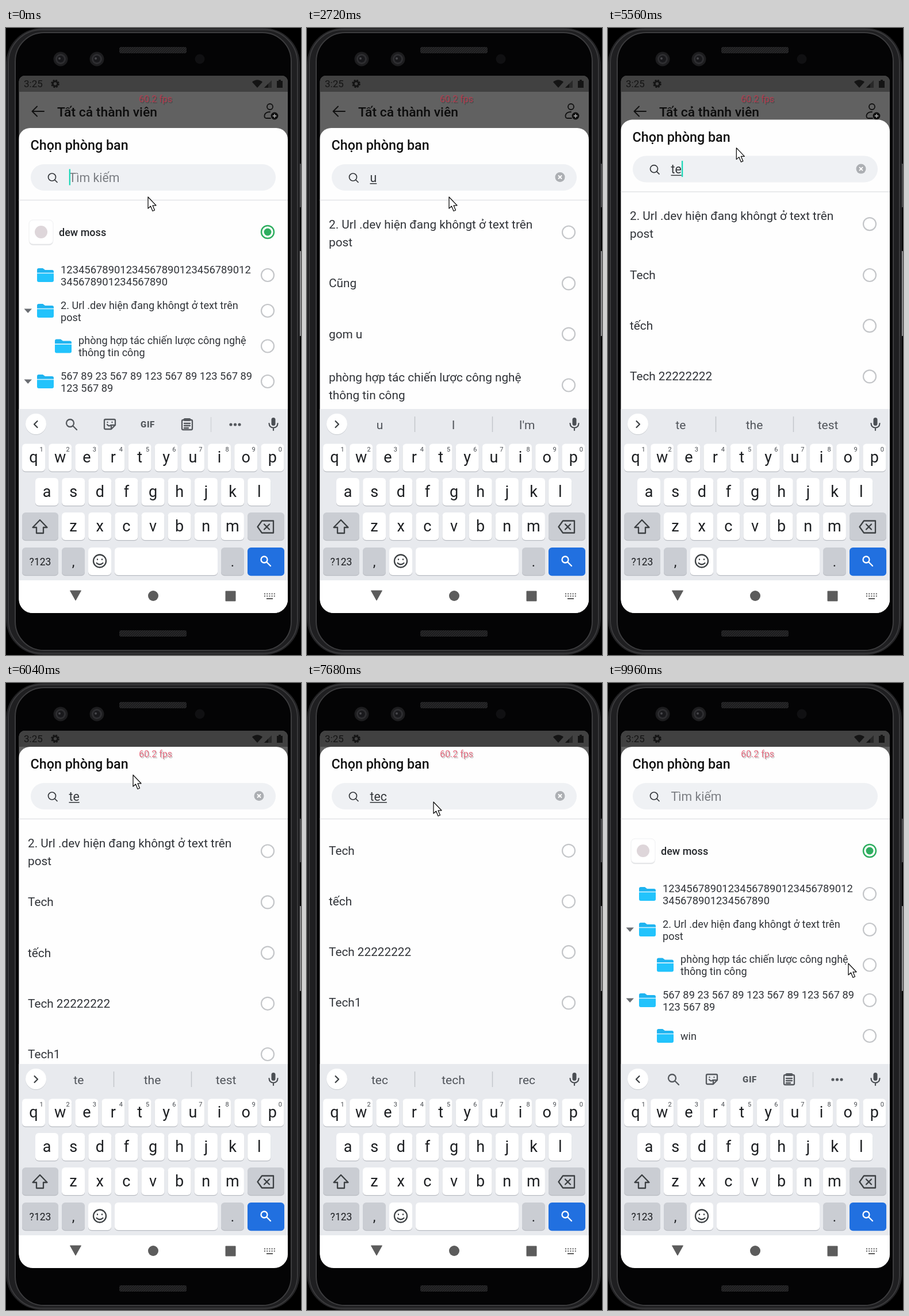
Recreate the animation shown at these times as an HTML page. Size 513x1091 px, loop 10 s.

```html
<!DOCTYPE html>
<html lang="vi">
<head>
<meta charset="utf-8">
<title>Chọn phòng ban</title>
<style>
html, body { margin: 0; width: 100%; height: 100%; overflow: hidden; background: #000; }
svg { display: block; width: 100vw; height: 100vh; font-family: Roboto, "Noto Sans", sans-serif; }
text { white-space: pre; }
.mid { text-anchor: middle; }
.med { font-weight: 500; }
.line { fill: none; stroke-linecap: round; stroke-linejoin: round; }
</style>
</head>
<body>
<svg id="stage" viewBox="0 0 513 1091" preserveAspectRatio="none">
  <defs>
    <clipPath id="screen"><path d="M22.500 93A10 10 0 0 1 32.500 83H480A10 10 0 0 1 490 93V994A24 24 0 0 1 466 1018H46.500A24 24 0 0 1 22.500 994Z"/></clipPath>
    <pattern id="mesh" width="4" height="4" patternUnits="userSpaceOnUse">
      <rect width="4" height="4" fill="#272729"/><path d="M0 4L4 0" stroke="#111"/>
    </pattern>
    <g id="lens"><circle r="12.5" fill="#1d1d1f"/><circle r="9" fill="#2e2e31"/><circle r="6" fill="#19191c"/><circle cx="-2" cy="-1" r="2" fill="#47474b"/></g>
    <g id="folder">
      <path d="M0-9Q0-12 3-12H10L14-9H26Q29-9 29-6V-4H0Z" fill="#1fb4f0"/>
      <path d="M0-3H29V9Q29 12 26 12H3Q0 12 0 9Z" fill="#22c3fc"/>
      <path d="M0-3.5H29" stroke="#d9f4ff" stroke-width="1.4"/>
    </g>
    <circle id="radio" cx="455" r="11" fill="#fff" stroke="#c4c6c9" stroke-width="2.2"/>
  </defs>

  <!-- phone body -->
  <rect x="509" y="236" width="4" height="76" rx="1" fill="#4a4a4c"/>
  <rect x="509" y="388" width="4" height="148" rx="1" fill="#8b8b8d"/>
  <rect x=".5" y=".5" width="510" height="1090" rx="62" fill="#1c1c1e" stroke="#2e2e30"/>
  <rect x="4" y="3" width="503" height="1085" rx="58" fill="#1f1f21" stroke="#3a3a3c" stroke-width="2"/>
  <rect x="16" y="8" width="480" height="1075" rx="50" fill="#040405" stroke="#3c3c3e" stroke-width="2"/>
  <use href="#lens" x="95" y="54"/><use href="#lens" x="158" y="54"/>
  <circle cx="337" cy="54" r="8.5" fill="#101012"/>
  <rect x="197" y="33" width="117" height="11" rx="3" fill="url(#mesh)"/>
  <rect x="197" y="1048" width="117" height="11" rx="3" fill="url(#mesh)"/>

  <g clip-path="url(#screen)">
    <rect x="22" y="83" width="468" height="935" fill="#616161"/>
    <rect x="22" y="83" width="468" height="28" fill="#414141"/>
    <!-- status bar -->
    <g fill="#141414">
      <text x="31" y="103" font-size="17">3:25</text>
      <circle cx="85.500" cy="97" r="4.200" fill="none" stroke="#141414" stroke-width="3"/>
      <circle cx="85.500" cy="97" r="6.300" fill="none" stroke="#141414" stroke-width="2" stroke-dasharray="3 1.950"/>
      <path d="M428 94Q437 86.500 446 94L437 104Z"/>
      <path d="M449 104L462 91V104Z" opacity=".55"/><path d="M449 104L456 97V104Z"/>
      <path d="M471 92H474V90H478V92H481V104H471Z"/>
    </g>
    <!-- app bar -->
    <path class="line" d="M66 145H46M54 136.500L45.500 145L54 153.500" stroke="#111" stroke-width="2"/>
    <text x="89" y="153.500" font-size="22.900" class="med" fill="#0c0c0c">Tất cả thành viên</text>
    <g class="line" stroke="#111" stroke-width="1.800">
      <circle cx="459" cy="137" r="5"/><path d="M460 157H453Q449 157 449.500 152Q451 146 459 146"/>
      <circle cx="467" cy="153" r="5.500" fill="#111"/><path d="M464.500 153H469.500M467 150.500V155.500" stroke="#999"/>
    </g>

    <!-- sheet -->
    <g id="sheet">
      <rect x="22" y="174" width="468" height="900" rx="20" fill="#fefefe"/>
      <text x="42.500" y="212" font-size="23.300" class="med" fill="#111">Chọn phòng ban</text>
      <rect x="43" y="237" width="426" height="46" rx="23" fill="#eff1f4"/>
      <g class="line" stroke="#33363a" stroke-width="1.700"><circle cx="80" cy="259.500" r="6.500"/><path d="M85 264.500L89 268.500"/></g>
      <text id="hint" x="109.500" y="267.500" font-size="21.300" fill="#7b7e83">Tìm kiếm</text>
      <text id="typed" x="109.500" y="267.500" font-size="21.300" fill="#33363a"></text>
      <rect id="under" x="109.500" y="270" height="1.500" fill="#33363a"/>
      <rect id="caret" y="245.500" width="2.300" height="28" fill="#1fd8b8"/>
      <g id="clear"><circle cx="440" cy="259.500" r="8.500" fill="#acafb3"/><path d="M437 256.500L443 262.500M443 256.500L437 262.500" stroke="#fff" stroke-width="1.800"/></g>
      <path d="M22 299.500H490" stroke="#e2e3e6" stroke-width="1.500"/>
      <g id="tree"></g>
      <g id="found"></g>
    </g>

    <!-- keyboard -->
    <rect x="22" y="663" width="468" height="299" fill="#e8eaee"/>
    <rect x="22" y="961" width="468" height="57" fill="#fff"/>
    <circle cx="52" cy="690" r="18" fill="#c9ccd1"/><circle cx="52" cy="689" r="18" fill="#fff"/>
    <path id="chevron" class="line" stroke="#3c4043" stroke-width="2.200"/>
    <g fill="#4b4f54">
      <rect x="461.500" y="678" width="7" height="14" rx="3.500"/>
      <path class="line" d="M457.500 688Q458 695.500 465 695.500T472.500 688M465 696V700" stroke="#4b4f54" stroke-width="2.200"/>
    </g>
    <g id="tools">
      <g class="line" stroke="#55595e" stroke-width="2.300">
        <circle cx="111.500" cy="687.500" r="6.500"/><path d="M116.500 692.500L123 699"/>
        <path d="M173 681H188Q190 681 190 683V691L183 698H173Q171 698 171 696V683Q171 681 173 681ZM183 698V691H190M176 690Q179 694 182 691M176.500 686V686.200M184.500 686V686.200"/>
        <path d="M308 682H322Q324 682 324 684V697Q324 699 322 699H308Q306 699 306 697V684Q306 682 308 682ZM310 688H320M310 692H320M310 696H317"/>
        <path d="M311 681.500H319" stroke-width="5"/>
      </g>
      <text x="246.500" y="695" font-size="15" font-weight="900" class="mid" fill="#55595e" letter-spacing=".6">GIF</text>
      <path d="M356.500 677V703" stroke="#d2d4d8" stroke-width="1.500"/>
      <g fill="#55595e"><circle cx="391" cy="690" r="2.600"/><circle cx="398.500" cy="690" r="2.600"/><circle cx="406" cy="690" r="2.600"/></g>
    </g>
    <g id="words" font-size="21" class="mid" fill="#50545a">
      <path d="M187.500 676V703M322.500 676V703" stroke="#c3c6cb" stroke-width="1.500"/>
      <text x="126.500" y="697.500"></text><text x="254.500" y="697.500"></text><text x="382.500" y="697.500"></text>
    </g>
    <g id="keys"></g>
    <g class="line" stroke="#3c4043" stroke-width="2.300">
      <path d="M59 856L71.500 869H65V879H53V869H46.500Z"/>
      <path d="M445 857.500H465V878.500H445L437.500 868ZM449 863.500L458 872.500M458 863.500L449 872.500"/>
      <circle cx="163" cy="927.500" r="11"/><path d="M157.500 931Q163 936 168.500 931M159 924.500V925M167 924.500V925"/>
      <g stroke="#fff"><circle cx="449" cy="925" r="5.500"/><path d="M453.500 929.500L460 936"/></g>
    </g>
    <!-- navigation -->
    <g fill="#5c5c5c">
      <path d="M111.500 979H130.500L121 996Z" stroke="#5c5c5c" stroke-linejoin="round"/>
      <circle cx="256" cy="988" r="9"/><rect x="381.500" y="979.500" width="18" height="18" rx="1"/>
      <path d="M449 984.500H468M449 988.500H468" stroke="#5c5c5c" stroke-width="2" stroke-dasharray="2 2.200"/>
      <path d="M453 993H464" stroke="#5c5c5c" stroke-width="2"/>
    </g>
  </g>

  <text id="fpsShade" x="232.500" y="131" font-size="16" fill="#000" opacity=".22"></text>
  <text id="fps" x="231" y="129" font-size="16" fill="#dc2845" opacity=".65"></text>
  <path id="pointer" d="M0 0V20L4.500 16L8 24.500L11.500 23L8 14.800H14Z" fill="#fff" stroke="#111" stroke-width="1.300" stroke-linejoin="round"/>
</svg>
<script>
const $ = id => document.getElementById(id);
const LOOP = 10000;
const FADE = 120, MOVE = 250;

const label = (x, y, size, s, extra = 'fill="#303338"') =>
  `<text x="${x}" y="${y}" font-size="${size}" ${extra}>${s}</text>`;

// Department tree
const branch = (y, indent, open, size, ...lines) =>
  `<g transform="translate(0 ${y})"><use href="#folder" x="${54 + indent}"/><use href="#radio"/>` +
  (open ? '<path d="M31.500-3.500H45L38.200 4Z" fill="#6a6d72"/>' : '') +
  lines.map((s, i) => label(95 + indent, (lines.length > 1 ? -3.5 : 6.5) + i * 21, size, s)).join('') + '</g>';

const URL_ROW = ['2. Url .dev hiện đang khôngt ở text trên', 'post'];
const TEAM_ROW = ['phòng hợp tác chiến lược công nghệ', 'thông tin công'];

$('tree').innerHTML =
  `<rect x="40" y="336" width="42" height="42" rx="7" fill="#e3e4e6"/>
   <rect x="40" y="334" width="42" height="42" rx="7" fill="#fff" stroke="#eeeff1"/>
   <circle cx="61" cy="355" r="11" fill="#ded6da"/>` +
  label(92, 361.500, 18, 'dew moss', 'class="med" fill="#24272b"') +
  `<circle cx="455" cy="355" r="11" fill="#fff" stroke="#2fae60" stroke-width="2.500"/>
   <circle cx="455" cy="355" r="6.500" fill="#2fae60"/>` +
  branch(430, 0, false, 18.4, '12345678901234567890123456789012', '345678901234567890') +
  branch(492, 0, true, 18.1, ...URL_ROW) +
  branch(553.5, 31, false, 18.1, ...TEAM_ROW) +
  branch(615, 0, true, 18.3, '567 89 23 567 89 123 567 89 123 567 89', '123 567 89') +
  branch(677, 31, false, 18.1, 'win');

// Search results
const items = {
  url: URL_ROW, cung: ['Cũng'], gom: ['gom u'], team: TEAM_ROW,
  tech: ['Tech'], tech_: ['tếch'], tech2: ['Tech 22222222'], tech1: ['Tech1']
};
$('found').innerHTML = Object.entries(items).map(([id, lines]) =>
  `<g id="${id}"><use href="#radio"/>` +
  lines.map((s, i) => label(38, (lines.length > 1 ? -7 : 7) + i * 31, 20.75, s)).join('') + '</g>').join('');

const TECHS = ['tech', 'tech_', 'tech2', 'tech1'];
const lists = [
  [0, null],
  [2320, ['url', 'cung', 'gom', 'team']],
  [4239, ['url', 'team', ...TECHS]],
  [4960, ['url', ...TECHS]],
  [7240, TECHS],
  [8850, null]
];

const edits = [[0, ''], [1880, 'u'], [3640, ''], [3800, 't'], [4540, 'te'],
  [6800, 'tec'], [8000, 'te'], [8200, 't'], [8400, '']];
const guesses = {
  u: ['u', 'I', "I'm"], t: ['t', 'thanks', 'thank'],
  te: ['te', 'the', 'test'], tec: ['tec', 'tech', 'rec']
};

// Keyboard
const GREY = '#cacdd3', BLUE = '#2170e0';
const key = (x, y, w, s = '', fill = '#fff', size = 27) =>
  `<rect x="${x}" y="${y + 1.3}" width="${w}" height="48" rx="6" fill="${fill === BLUE ? BLUE : '#b9bcc2'}"/>
   <rect x="${x}" y="${y}" width="${w}" height="48" rx="6" fill="${fill}"/>` +
  label(x + w / 2, y + (size < 20 ? 31 : 32.5), size, s, 'class="mid" fill="#1d1f22"');
const keyRow = (s, x, y) => [...s].map((c, i) => key(x + i * 46.15, y, 40, c)).join('');

$('keys').innerHTML = keyRow('qwertyuiop', 28, 723.5) + keyRow('asdfghjkl', 51, 783) + keyRow('zxcvbnm', 97, 843) +
  [...'1234567890'].map((c, i) => label(61.5 + i * 46.15, 736.5, 11, c, 'class="mid" fill="#45494e"')).join('') +
  key(28, 843, 63, '', GREY) + key(420, 843, 64, '', GREY) +
  key(28, 904, 63, '?123', GREY, 17.5) + key(97, 904, 40, ',', GREY, 24) + key(143, 904, 40) +
  key(189, 904, 179) + key(374, 904, 40, '.', GREY, 24) + key(420, 904, 64, '', BLUE);

const route = [[0, 247, 294], [5250, 247, 294], [5450, 224, 223], [5800, 221, 160],
  [6600, 221, 160], [7000, 220, 207], [8600, 220, 207], [9300, 418, 488], [LOOP, 418, 488]];

const clamp = x => Math.max(0, Math.min(1, x));
const ease = x => (1 - Math.cos(Math.PI * clamp(x))) / 2;
const mix = (a, b, p) => a + (b - a) * p;
const lastIndex = (steps, t) => steps.reduce((n, s, i) => s[0] <= t ? i : n, 0);
const show = (id, on) => $(id).style.display = on ? '' : 'none';
const put = (id, x, y) => $(id).setAttribute('transform', `translate(${x} ${y})`);

function places(ids) {
  const out = {};
  let top = 310.7;
  for (const id of ids || []) {
    const h = items[id].length > 1 ? 89.6 : 88.2;
    out[id] = top + h / 2;
    top += h;
  }
  return out;
}

// Removed rows fade first, then kept rows slide, then new rows fade in
function drawList(t) {
  const n = lastIndex(lists, t);
  const [start, ids] = lists[n];
  show('tree', !ids);
  show('found', ids);
  if (!ids) return;
  const now = places(ids), swap = !lists[n - 1][1];
  const old = swap ? now : places(lists[n - 1][1]);
  const dt = t - start;
  for (const id in items) {
    const was = id in old, is = id in now;
    show(id, was || is);
    if (!was && !is) continue;
    const y = was && is ? mix(old[id], now[id], ease((dt - FADE) / MOVE)) : is ? now[id] : old[id];
    const alpha = was && is ? 1 : is ? clamp((dt - FADE - MOVE) / FADE) : 1 - clamp(dt / FADE);
    put(id, 0, y);
    $(id).setAttribute('opacity', alpha);
  }
}

function drawInput(t) {
  const [since, text] = edits[lastIndex(edits, t)];
  const hinted = edits[lastIndex(edits, t - 120)][1];
  const typed = $('typed');
  typed.textContent = text;
  const w = text ? typed.getComputedTextLength() : 0;
  show('hint', !text);
  show('clear', text);
  show('under', text && hinted);
  $('under').setAttribute('width', w);
  show('caret', (t - since) % 1000 < 500);
  $('caret').setAttribute('x', 109.7 + w);

  show('tools', !hinted);
  show('words', hinted);
  $('chevron').setAttribute('d', hinted ? 'M49.500 684L55 689.500L49.500 695' : 'M54.500 684L49 689.500L54.500 695');
  $('words').querySelectorAll('text').forEach((el, i) => el.textContent = hinted ? guesses[hinted][i] : '');
}

function draw(t) {
  drawInput(t);
  drawList(t);
  put('sheet', 0, -63 * ease((t - 5450) / 350));
  const i = Math.min(lastIndex(route, t), route.length - 2);
  const [t0, x0, y0] = route[i], [t1, x1, y1] = route[i + 1];
  const p = ease((t - t0) / (t1 - t0));
  put('pointer', mix(x0, x1, p), mix(y0, y1, p));
  $('fps').textContent = $('fpsShade').textContent = t >= 1500 && t < 2200 ? '59.9 fps' : '60.2 fps';
}

const begin = performance.now();
function tick() {
  draw((performance.now() - begin) % LOOP);
  requestAnimationFrame(tick);
}
tick();
</script>
</body>
</html>
```
